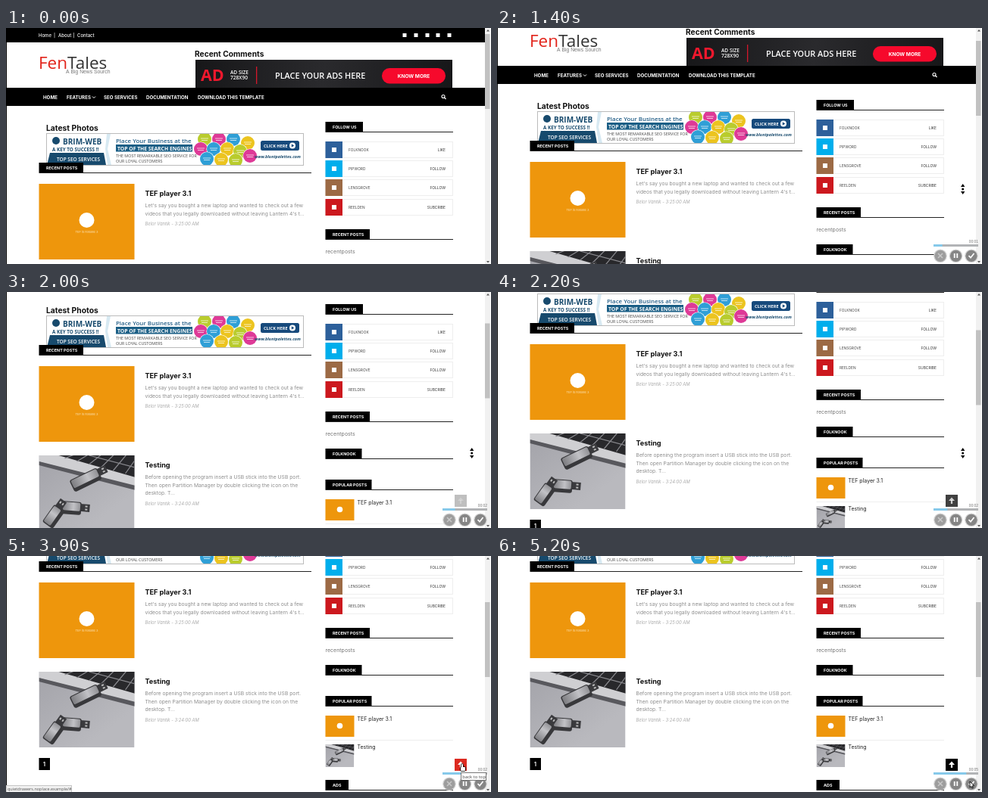
Recreate the animation shown at these times as an HTML page with a canvas. Size 640 by 312 pixels, loop 5.3 s.

```html
<!DOCTYPE html>
<html lang="en">
<head>
<meta charset="utf-8">
<title>News page scroll</title>
<style>
html, body { margin: 0; width: 100%; height: 100%; overflow: hidden; background: #fff; }
canvas { display: block; width: 640px; height: 312px; }
</style>
</head>
<body>
<canvas id="stage" width="640" height="312"></canvas>
<script>
const ctx = document.getElementById('stage').getContext('2d');
const LOOP = 5300, STEP = 100;
const SANS = 'Inter, sans-serif', HUMAN = '"Open Sans", sans-serif', PLAIN = '"Liberation Sans", sans-serif';

function rect(x, y, w, h, color) {
  ctx.fillStyle = color;
  ctx.fillRect(x, y, w, h);
}
function outline(x, y, w, h, color) {
  ctx.strokeStyle = color;
  ctx.lineWidth = 1;
  ctx.strokeRect(x + 0.5, y + 0.5, w - 1, h - 1);
}
function disc(x, y, r, color) {
  ctx.fillStyle = color;
  ctx.beginPath();
  ctx.arc(x, y, r, 0, 7);
  ctx.fill();
}
function pill(x, y, w, h, r, color) {
  ctx.fillStyle = color;
  ctx.beginPath();
  ctx.roundRect(x, y, w, h, r);
  ctx.fill();
}
function poly(points, color) {
  ctx.fillStyle = color;
  ctx.beginPath();
  points.forEach(([x, y]) => ctx.lineTo(x, y));
  ctx.closePath();
  ctx.fill();
}
function line(points, color, width) {
  ctx.strokeStyle = color;
  ctx.lineWidth = width;
  ctx.beginPath();
  points.forEach(([x, y]) => ctx.lineTo(x, y));
  ctx.stroke();
}
function text(str, x, y, size, color, style = '', family = SANS, align = 'left') {
  ctx.font = `${style} ${size}px ${family}`;
  ctx.fillStyle = color;
  ctx.textAlign = align;
  ctx.fillText(str, x, y);
}
const bold = (str, x, y, size, color, align) => text(str, x, y, size, color, 'bold', SANS, align);

// Linear interpolation through [time, ...values] keys
function track(keys, t) {
  if (t <= keys[0][0]) return keys[0].slice(1);
  for (let i = 1; i < keys.length; i++) {
    const a = keys[i - 1], b = keys[i];
    if (t <= b[0]) {
      const k = (t - a[0]) / (b[0] - a[0]);
      return a.slice(1).map((v, j) => v + (b[j + 1] - v) * k);
    }
  }
  return keys[keys.length - 1].slice(1);
}

function header() {
  rect(0, 0, 632, 19, '#000');
  [['Home', 43], ['|', 63], ['About', 69], ['|', 88.5], ['Contact', 94]]
    .forEach(([s, x]) => text(s, x, 12, 6, '#fff', '500'));
  [526, 541, 556, 570, 585].forEach(x => rect(x - 2.5, 7, 5, 5, '#fff'));

  text('Fen', 43, 54, 22.5, '#e2231a', '', HUMAN);
  text('Tales', 43 + ctx.measureText('Fen').width, 54, 22.5, '#333', '', HUMAN);
  text('A Big News Sourch', 79, 60, 6.8, '#777', '', PLAIN);
  bold('Recent Comments', 249, 38, 10.2, '#111');

  const g = ctx.createLinearGradient(250, 42, 589, 79);
  g.addColorStop(0, '#171719');
  g.addColorStop(0.5, '#2a2a2d');
  g.addColorStop(1, '#171719');
  rect(250, 42, 339, 37, g);
  text('AD', 257, 70, 21.5, '#f0182d', 'bold', HUMAN);
  text('AD SIZE', 296, 61, 6.6, '#fff', '600', HUMAN);
  text('728X90', 296, 68, 6.6, '#fff', '600', HUMAN);
  rect(330, 51, 1.3, 23, '#d3172b');
  text('PLACE YOUR ADS HERE', 355, 66.5, 10.9, '#fff', '600', HUMAN);
  pill(496, 53, 84, 20.5, 10, '#f6092c');
  bold('KNOW MORE', 538, 65.5, 6.6, '#fff', 'center');

  rect(0, 79, 632, 24, '#000');
  [['HOME', 49], ['FEATURES', 80], ['SEO SERVICES', 129], ['DOCUMENTATION', 185], ['DOWNLOAD THIS TEMPLATE', 253]]
    .forEach(([s, x]) => bold(s, x, 93.5, 6.2, '#fff'));
  line([[114, 90.5], [116, 92.5], [118, 90.5]], '#fff', 1);
  ctx.strokeStyle = '#fff';
  ctx.lineWidth = 1.1;
  ctx.beginPath();
  ctx.arc(577, 90.5, 2, 0, 7);
  ctx.stroke();
  line([[578.5, 92], [580.5, 94]], '#fff', 1.3);
}

function banner() {
  const navy = '#174a6d';
  bold('Latest Photos', 53, 136, 10.3, '#111');
  rect(53, 139, 340, 43, '#fff');
  outline(53, 139, 340, 43, '#bbb');
  disc(66, 149, 5, navy);
  text('BRIM-WEB', 75, 153.5, 10, navy, 'bold', HUMAN);
  text('A KEY TO SUCCESS !!', 61, 162.5, 6.3, navy, 'bold', HUMAN);
  poly([[58, 165], [129, 165], [132, 181], [54, 181]], navy);
  text('TOP SEO SERVICES', 67, 175.5, 6.5, '#fff', '600', HUMAN);
  poly([[133, 140], [138, 140], [134, 160], [139, 181], [134, 181], [131, 160]], '#d7e9f2');

  text('Place Your Business at the', 145, 151.5, 7.9, '#245f88', '600', HUMAN);
  rect(145, 154, 101, 9.5, '#1b5f86');
  text('TOP OF THE SEARCH ENGINES', 147, 161.5, 6.8, '#fff', 'bold', HUMAN);
  text('THE MOST REMARKABLE SEO SERVICE FOR', 145, 170.5, 5.4, '#444', '', HUMAN);
  text('OUR LOYAL CUSTOMERS', 145, 177.5, 5.4, '#444', '', HUMAN);

  ctx.save();
  ctx.beginPath();
  ctx.rect(54, 140, 338, 41);
  ctx.clip();
  const hues = ['#b9cc2d', '#de3a97', '#2f9fd6', '#ecc41f'];
  [[262, 147], [281, 147], [300, 147], [319, 152], [257, 160], [274, 160], [292, 160], [309, 163],
    [265, 173], [284, 174], [303, 175], [322, 169]].forEach(([x, y], i) => {
    disc(x, y, 9.6, '#fff');
    disc(x, y, 9, hues[(i + (i >> 2)) % 4]);
    rect(x - 5, y - 1.5, 10, 1, '#ffffffb0');
    rect(x - 4, y + 1, 8, 1, '#ffffffb0');
  });
  ctx.restore();

  pill(336, 149, 51, 13, 2.5, '#174a7c');
  text('CLICK HERE', 340, 157.8, 5.6, '#fff', 'bold', HUMAN);
  disc(378, 155.5, 4, '#fff');
  poly([[376.8, 153.3], [380.3, 155.5], [376.8, 157.7]], '#174a7c');
  text('www.bluntpalettes.com', 328, 172, 5.4, '#174a6d', 'italic bold', HUMAN);
}

function tab(label, x, y, w, right) {
  rect(x, y, w, 13, '#000');
  rect(x, y + 13, right - x, 1, '#222');
  bold(label, x + 9.5, y + 8.8, 5.4, '#fff');
}

function cover(x, y, w, h, k) {
  rect(x, y, w, h, '#ee960c');
  disc(x + w / 2, y + h * 0.48, 10 * k, '#fff');
  if (k === 1) text('TEF is release 3', x + w / 2, y + 65, 4, '#fbe3b8', '', SANS, 'center');
}

// One flash drive: dark side, silver face, plug on the right end
function drive(x, y, angle, length) {
  ctx.save();
  ctx.translate(x, y);
  ctx.rotate(angle);
  rect(length / 2 - 2, -5, 13, 10, '#3a3a3d');
  rect(length / 2 + 5, -3, 3, 2, '#bbb');
  rect(length / 2 + 5, 1, 3, 2, '#bbb');
  pill(-length / 2, -7, length, 17, 3, '#38383b');
  const g = ctx.createLinearGradient(-length / 2, 0, length / 2, 0);
  g.addColorStop(0, '#78787c');
  g.addColorStop(0.6, '#c2c2c6');
  g.addColorStop(1, '#8c8c90');
  pill(-length / 2 + 1.5, -6, length - 3, 11, 2, g);
  ctx.restore();
}

function photo(x, y, k) {
  ctx.save();
  ctx.translate(x, y);
  ctx.scale(k, k);
  ctx.beginPath();
  ctx.rect(0, 0, 126, 100);
  ctx.clip();
  const g = ctx.createLinearGradient(0, 20, 60, 100);
  g.addColorStop(0, '#a6a6ac');
  g.addColorStop(1, '#b9b9be');
  rect(0, 0, 126, 100, g);
  poly([[0, 0], [127, 0], [127, 42], [0, 8]], '#cfcfd2');
  poly([[26, 0], [127, 0], [127, 29]], '#28282b');
  for (let i = 0; i < 7; i++) line([[34 + i * 16, 4 + i * 4], [54 + i * 16, -4]], '#8a8a8f', 1.2);
  line([[66, 0], [127, 16]], '#8a8a8f', 1.2);
  poly([[0, 8], [127, 40], [127, 46], [0, 13]], '#58585d');
  drive(61, 31, -0.45, 40);
  drive(43, 68, 0.08, 26);
  drive(18, 80, -0.95, 28);
  ctx.restore();
}

function post(y, title, lines, time) {
  bold(title, 183.5, y + 15.5, 9.1, '#111');
  lines.forEach((s, i) => text(s, 183.5, y + 30.8 + i * 10.7, 6.74, '#8d8d8d'));
  text(`Belor Vantik - ${time} AM`, 183.5, y + 34 + lines.length * 10.7, 5.8, '#aaa', 'italic');
}

function posts() {
  tab('RECENT POSTS', 43.5, 178, 58.5, 403);
  cover(43.5, 206, 126, 100, 1);
  post(206, 'TEF player 3.1', [
    "Let's say you bought a new laptop and wanted to check out a few",
    "videos that you legally downloaded without leaving Lantern 4's t..."
  ], '3:25:00');
  photo(43.5, 324, 1);
  post(324, 'Testing', [
    'Before opening the program insert a USB stick into the USB port.',
    'Then open Partition Manager by double clicking the icon on the',
    'desktop. T...'
  ], '3:24:00');
  rect(43.5, 438, 14.5, 16, '#000');
  bold('1', 50.5, 448.5, 7, '#fff', 'center');
}

function sidebar() {
  const x = 421.5, right = 590;
  tab('FOLLOW US', x, 124, 49.5, right);
  [['FOLKNOOK', 'LIKE', '#2d609b'], ['PIPWORD', 'FOLLOW', '#00aeec'],
    ['LENSGROVE', 'FOLLOW', '#9c6a45'], ['REELDEN', 'SUBCRIBE', '#cc181e']].forEach(([name, action, color], i) => {
    const y = Math.round(150 + i * 25.2);
    outline(x, y, 168.5, 22, '#eee');
    rect(x, y, 22.5, 22, color);
    rect(x + 8.5, y + 8, 6, 6, '#fff');
    text(name, 452, y + 13, 4.8, '#444');
    text(action, 580, y + 13, 4.9, '#333', '', SANS, 'right');
  });
  tab('RECENT POSTS', x, 266, 58.5, right);
  text('recentposts', x, 298, 7, '#777');
  tab('FOLKNOOK', x, 315, 48, right);
  tab('POPULAR POSTS', x, 356, 61, right);
  cover(x, 382, 38, 28, 0.38);
  text('TEF player 3.1', 463.5, 388.6, 7, '#222');
  rect(x, 414, 168.5, 1, '#eee');
  photo(x, 420, 0.3);
  text('Testing', 463.5, 426.4, 7, '#222');
  tab('ADS', x, 467, 30.5, right);
}

function scrollbar(scroll) {
  rect(632, 0, 7, 312, '#f1f1f1');
  rect(632, 8 + scroll * 0.31, 6.5, 99, '#c1c1c1');
  poly([[634, 4.5], [636, 2], [638, 4.5]], '#555');
  poly([[634, 308], [636, 310.5], [638, 308]], '#555');
  rect(0, 0, 1, 312, '#000');
}

function topButton(hover, alpha) {
  ctx.globalAlpha = alpha;
  rect(592, 268, 16, 16, hover ? '#dc2a20' : '#000');
  poly([[596, 276], [600, 271.5], [604, 276]], '#fff');
  rect(598.9, 275, 2.2, 5, '#fff');
  ctx.globalAlpha = 1;
}

function recorder(t) {
  const clock = [[0, 0], [900, 1], [2000, 2], [4300, 3], [4600, 4], [4900, 5]].filter(k => t >= k[0]).pop()[1];
  text(`00:0${clock}`, 635, 284, 4.9, '#777', '', PLAIN, 'right');
  rect(576, 286, 59, 3, '#b2b4b6');
  rect(576, 286, 59 * t / 7100, 3, '#86c9ea');
  [585, 605.5, 626].forEach((x, i) => {
    disc(x, 301.3, 8.8, '#d2d2d2');
    disc(x, 301.3, 7.6, i ? '#858585' : '#9d9d9d');
  });
  line([[582, 298], [588, 304]], '#c9c9c9', 1.5);
  line([[588, 298], [582, 304]], '#c9c9c9', 1.5);
  rect(602.8, 298, 1.8, 6, '#fff');
  rect(606.4, 298, 1.8, 6, '#fff');
  line([[622.5, 301], [625, 303.7], [629.5, 298]], '#fff', 1.7);
}

function tooltip() {
  rect(600, 286, 34, 11, '#fff');
  outline(600, 286, 34, 11, '#777');
  text('back to top', 602.3, 293.5, 5.9, '#444', '', HUMAN);
}

function statusBar() {
  rect(0, 303, 87, 9, '#f0f0f0');
  outline(0, 303, 87, 10, '#c6c6c6');
  text('quietdrawers.noplace.example/#', 2, 310, 5.5, '#555', '', HUMAN);
}

function arrow(x, y) {
  const shape = [[0, 0], [0, 8], [1.8, 6.4], [3, 9], [4.3, 8.4], [3.1, 5.9], [5.6, 5.7]].map(([a, b]) => [x + a, y + b]);
  poly(shape, '#fff');
  line([...shape, shape[0]], '#000', 0.9);
}

function hand(x, y) {
  ctx.beginPath();
  ctx.roundRect(x - 1, y, 2, 6, 1);
  ctx.roundRect(x - 2, y + 4, 6, 5, 1);
  ctx.strokeStyle = '#000';
  ctx.lineWidth = 1.6;
  ctx.stroke();
  ctx.fillStyle = '#fff';
  ctx.fill();
}

function panMark(x, y) {
  poly([[x - 2.7, y - 3], [x, y - 7], [x + 2.7, y - 3]], '#000');
  disc(x, y, 1.5, '#000');
  poly([[x - 2.7, y + 3], [x, y + 7], [x + 2.7, y + 3]], '#000');
}

const scrollKeys = [[1150, 0], [1400, 29], [1700, 65], [2200, 137], [2450, 171]];
const pointerKeys = [[500, 625, 298], [1000, 614, 208], [2450, 612, 226], [2700, 601, 236.5],
  [3000, 602, 275], [4300, 602, 275], [4700, 624, 298]];
const buttonFade = [[1900, 0], [2300, 1]];

function draw(t) {
  const scroll = Math.round(track(scrollKeys, t)[0]);
  const [px, py] = track(pointerKeys, t);
  const hover = t >= 3000 && t < 4500;

  rect(0, 0, 640, 312, '#fff');
  ctx.save();
  ctx.translate(0, -scroll);
  header();
  banner();
  posts();
  sidebar();
  ctx.restore();

  scrollbar(scroll);
  topButton(hover && t >= 3100, track(buttonFade, t)[0]);
  if (t >= 100) recorder(t);
  if (t >= 3300 && t < 4900) statusBar();
  if (t >= 3700 && t < 4500) tooltip();
  if (t >= 1100 && t < 2500) panMark(614.7, 213);
  else if (hover) hand(px, py);
  else if (t >= 500) arrow(px, py);
}

function tick() {
  draw(Math.floor(performance.now() % LOOP / STEP) * STEP);
  requestAnimationFrame(tick);
}
tick();
</script>
</body>
</html>
```
